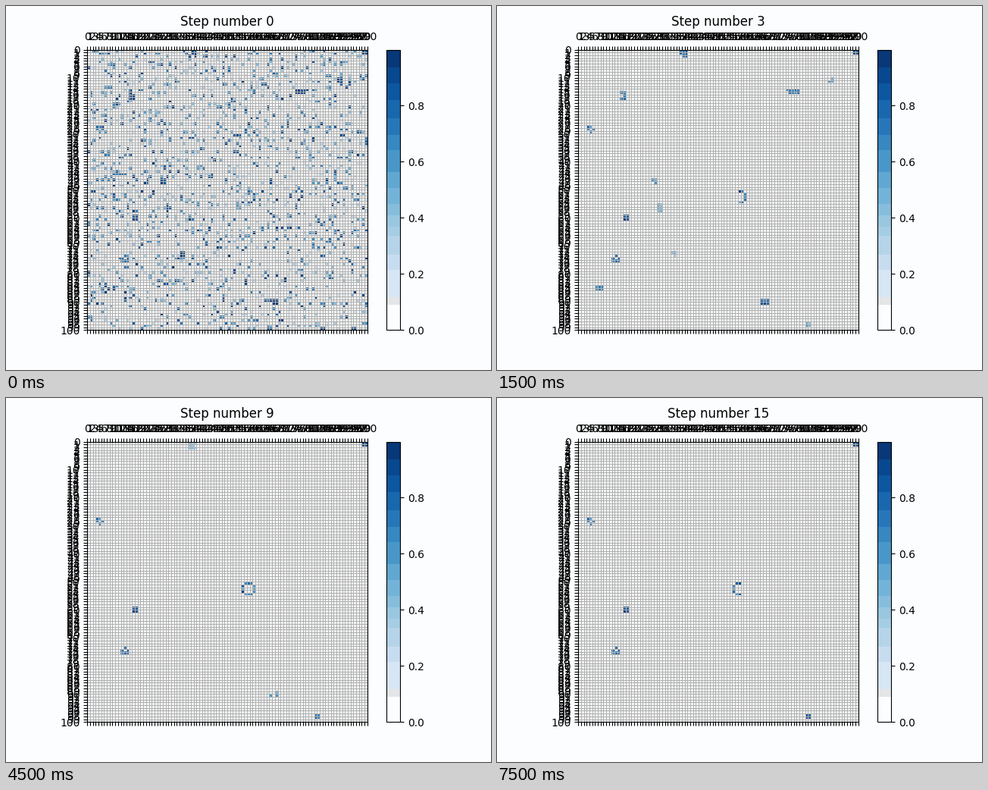
Write a matplotlib script that moves like this. It is 640 px wide and 480 px high and loops after 8 s.

```python
import numpy as np
import matplotlib.pyplot as plt
from matplotlib.animation import FuncAnimation
from matplotlib.colors import ListedColormap, to_rgb

N = 100
STEPS = 16
PAPER = "#fbfdff"
EDGES = [0, .09, .117, .215, .268, .335, .37, .41, .45, .505, .565,
         .64, .695, .755, .82, .88, .937, 1]

# Shapes that stay: column, row, drawing
BLOCK = "XX/XX"
STILL = [(98, 0, BLOCK), (16, 59, BLOCK),
         (3, 27, "XX./X.X/.X."), (12, 73, ".X./X.X/XXX")]

# Colonies that die out: column, row, width, height, last step
FADING = [(36, 0, 3, 3, 11), (74, 14, 5, 2, 7), (15, 15, 2, 3, 7),
          (89, 10, 2, 2, 5), (26, 46, 2, 2, 5), (28, 55, 2, 3, 4),
          (33, 72, 2, 2, 4), (6, 84, 3, 2, 7), (65, 89, 3, 2, 14)]

rows, cols = np.mgrid[:N, :N]


def evolve(cells):
    """Life with partly living cells: survival and birth shade over."""
    around = sum(np.roll(cells, (dy, dx), (0, 1))
                 for dy in (-1, 0, 1) for dx in (-1, 0, 1)) - cells
    survive = np.interp(around, [1.3, 2.1, 3], [0, 1, 0])
    birth = np.interp(around, [2.3, 3, 4], [0, 1, 0])
    return survive * cells + birth


def soup(step):
    """Random cells that thin out within three steps."""
    rng = np.random.default_rng(12)
    cells = (rng.random((N, N)) < .19) * rng.random((N, N))
    for _ in range(min(step, 2)):
        cells = evolve(cells)
    return cells * np.interp(step, [1, 3], [1, 0])


def stamp(grid, col, row, drawing, level, rng):
    for r, line in enumerate(drawing.split("/"), row):
        for c, mark in enumerate(line, col):
            if mark == "X":
                grid[r, c] = min(level + rng.uniform(-.15, .15), 1)


def draw_ring(grid, step, rng):
    """A ring that opens to the left, then closes from the right."""
    left = np.interp(step, [3, 8], [57, 54.5])
    right = np.interp(step, [11, 15], [59, 57])
    far = np.hypot(cols - 57, rows - 52)
    ring = (abs(far - 2.1) < .3) & (cols >= left) & (cols <= right)
    grid[ring] = rng.uniform(.5, 1, ring.sum())


def make_grid(step):
    grid = soup(step)
    still, flicker = np.random.default_rng(3), np.random.default_rng(step)
    for col, row, drawing in STILL:
        level = .95 if drawing == BLOCK else .72
        stamp(grid, col, row, drawing, level, still)
    stamp(grid, 81, 97, BLOCK, np.interp(step, [2, 12], [.5, .95]), still)
    for col, row, w, h, last in FADING:
        if step < last:
            level = 1.15 * (1 - step / last) ** .6
            shade = level * flicker.uniform(.7, 1, (h, w))
            shade *= flicker.random((h, w)) < .85
            grid[row:row + h, col:col + w] = shade
    draw_ring(grid, step, flicker)
    return grid


def banded_blues():
    blues = plt.get_cmap("Blues")
    bands = [blues((a + b) / 2)[:3] for a, b in zip(EDGES, EDGES[1:])]
    bands[:2] = [to_rgb(PAPER), to_rgb("#e4e5e7")]
    pos = (np.arange(512) + .5) / 512
    return ListedColormap([bands[np.searchsorted(EDGES, p) - 1] for p in pos])


fig, ax = plt.subplots(figsize=(6.4, 4.8), dpi=100, facecolor=PAPER)
image = ax.matshow(make_grid(0), cmap=banded_blues(), vmin=0, vmax=.999)
fig.colorbar(image)
ticks = np.arange(N + 1)
ax.set_xticks(ticks - .5, labels=ticks)
ax.set_yticks(ticks - .5, labels=ticks)
ax.grid(color="#b0b0b0", linewidth=.8)
title = ax.set_title("Step number 0")


def update(step):
    image.set_data(make_grid(step))
    title.set_text(f"Step number {step}")
    return image, title


anim = FuncAnimation(fig, update, frames=STEPS, interval=500, repeat=True,
                     repeat_delay=0)
plt.show()
```
